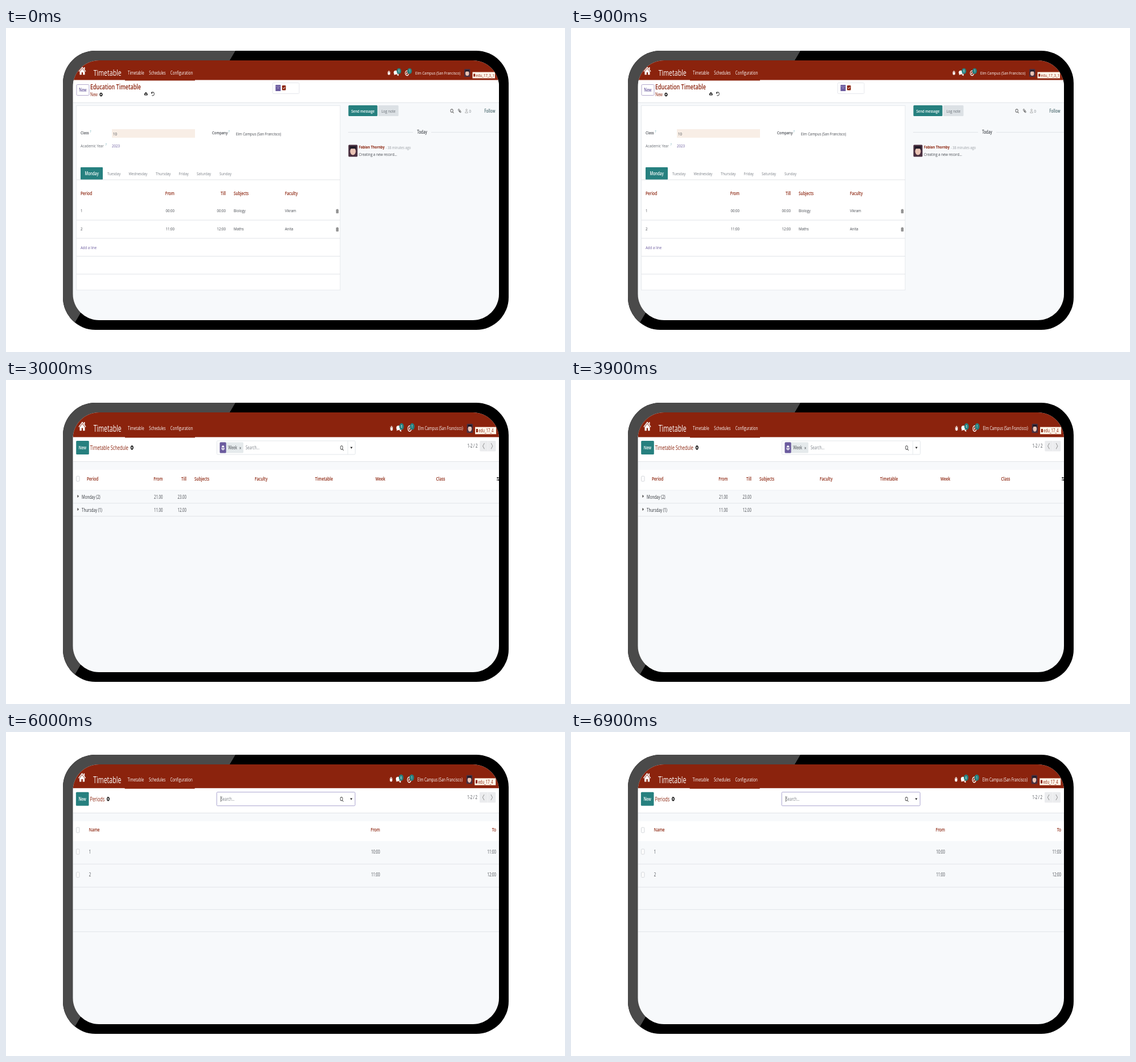
Write an HTML page that moves like this. It is 982 px wide and 570 px high and loops after 7.5 s.

```html
<!DOCTYPE html>
<html lang="en">
<head>
<meta charset="utf-8">
<title>Timetable screens</title>
<style>
html, body { margin: 0; width: 100%; height: 100%; overflow: hidden; background: #fff; }
svg { display: block; }
text { font-family: "Open Sans", "Noto Sans", sans-serif; white-space: pre; }
</style>
</head>
<body>
<svg id="stage" width="982" height="570" viewBox="0 0 982 570"></svg>
<script>
const RED = '#8b230d', TEAL = '#26807f', PURPLE = '#6b5b9e', INK = '#45494f',
  GREY = '#7c8188', LINE = '#e1e4e8', BG = '#f7f9fb';
const HOLD = 1500;
let out = '', k = 1; // k: vertical stretch of the current screen

const rect = (x, y, x2, y2, fill, r = 0, stroke = 'none') => {
  out += `<rect x="${x}" y="${y}" width="${x2 - x}" height="${y2 - y}" rx="${r}" fill="${fill}" stroke="${stroke}"/>`;
};
const hline = (y, x = 118, x2 = 866, color = LINE) => rect(x, y - .5, x2, y + .5, color);

// y is the middle of the capitals
const text = (x, y, s, fill = INK, size = 6.1, weight = 400, anchor = 'start') => {
  out += `<text transform="translate(${x} ${y + .36 * size * k}) scale(1 ${k})" font-size="${size}"
    font-weight="${weight}" fill="${fill}" text-anchor="${anchor}">${s}</text>`;
};
const right = (x, y, s, fill, size, weight) => text(x, y, s, fill, size, weight, 'end');
const mid = (x, y, s, fill, size, weight) => text(x, y, s, fill, size, weight, 'middle');
const head = (x, y, s, anchor) => text(x, y, s, RED, 6.5, 600, anchor);

const ICONS = {
  home: '<path d="M-6.5 .3L0-5.5 6.5 .3 5.7 1.2 0-3.8-5.7 1.2zM-4.5 1L0-3 4.5 1V5.2H1.2V2H-1.2V5.2H-4.5zM2.8-5H4.5V-1.8L2.8-3.2z"/>',
  bug: '<path d="M-1.3-1.6A1.3 1.3 0 0 1 1.3-1.6zM-1.8-1.2H1.8V1A1.8 1.8 0 0 1-1.8 1z"/><path d="M-2.8-1.6L2.8 2M2.8-1.6L-2.8 2M-2.8 .2H2.8" stroke="#fff" stroke-width=".5"/>',
  chat: '<ellipse cx="-.8" cy="-.5" rx="3.6" ry="2.7"/><path d="M-3.4 .8L-3.8 3-1 1.8zM1 2.4Q4 1.6 3.8-.6 5.4 1 4 2.6L4.4 4Q2 3.8 1 2.4"/>',
  clock: '<path d="M2-2.2A3.2 3.2 0 1 0 3.2 .6M0-1.4V.9H-1.6" fill="none" stroke="#fff" stroke-width="1.1"/>',
  gear: '<circle r="1.7" fill="none" stroke="#222" stroke-width="1.3"/><circle r="2.3" fill="none" stroke="#222" stroke-width="1" stroke-dasharray=".95 .86"/>',
  cloud: '<path d="M-2.2 2A1.6 1.6 0 0 1-2.2-.8 2.3 2.3 0 0 1 2.1-.8 1.5 1.5 0 0 1 2.2 2z" fill="#333"/><path d="M0-.8L1.2 .6H-1.2zM-.4 .3H.4V1.4H-.4z"/>',
  undo: '<path d="M-2.2-1.2A2.4 2.4 0 1 1-1.6 1.8M-2.5-2.6V-.8H-.7" fill="none" stroke="#333" stroke-width=".9"/>',
  lens: '<path d="M1.2 1.2L3 3M1.7-.4A2.1 2.1 0 1 1-2.5-.4 2.1 2.1 0 1 1 1.7-.4" fill="none" stroke="#555" stroke-width=".8"/>',
  clip: '<path d="M-1.6-.8L1.2 2.2Q2.6 2.2 2.2 .8L-1-2.6Q-2.8-3-2.6-1.2L.4 2M-.6-1L1 .8" fill="none" stroke="#555" stroke-width=".7"/>',
  user: '<path d="M-2.2 2.6V1.4Q0-.6 2.2 1.4V2.6zM1.2-1.4A1.2 1.2 0 1 1-1.2-1.4 1.2 1.2 0 1 1 1.2-1.4" fill="none" stroke="#999" stroke-width=".6"/>',
  trash: '<path d="M-2.3-1.8H2.3M-.8-2.5H.8M-1.7-1.2V2.4H1.7V-1.2zM-.6-.6V1.8M.6-.6V1.8" fill="none" stroke="#444" stroke-width=".6"/>',
  layers: '<path d="M0-2.6L2.8-1.3 0 0-2.8-1.3z"/><path d="M-2.8 .1L0 1.4 2.8 .1M-2.8 1.4L0 2.7 2.8 1.4" fill="none" stroke="#fff" stroke-width=".7"/>',
  down: '<path d="M-2-.9H2L0 1.3z" fill="#222"/>',
  next: '<path d="M-.9-1.8L1.2 0-.9 1.8z" fill="#222"/>',
  prevPage: '<path d="M1.4-3.4L-1.4 0 1.4 3.4" fill="none" stroke="#888" stroke-width=".7"/>',
  nextPage: '<path d="M-1.4-3.4L1.4 0-1.4 3.4" fill="none" stroke="#888" stroke-width=".7"/>',
  sliders: '<path d="M-2-1.3H3M-2 1.3H3" stroke="#222" stroke-width=".8"/><path d="M-1-2.2H.2V-.4H-1zM1 .4H2.2V2.2H1z" fill="#222"/>',
};
const icon = (name, x, y) => {
  out += `<g transform="translate(${x} ${y}) scale(1 ${k})" fill="#fff">${ICONS[name]}</g>`;
};

function avatar(x, y, x2, y2) {
  const cx = (x + x2) / 2, w = x2 - x, h = y2 - y;
  rect(x, y, x2, y2, '#4a3040', 1.5);
  out += `<ellipse cx="${cx}" cy="${y + h * .53}" rx="${w * .31}" ry="${h * .33}" fill="#e9c3b4"/>
    <path d="M${x + w * .15} ${y + h * .5}V${y + h * .12}H${x2 - w * .15}V${y + h * .5}L${x2 - w * .27} ${y + h * .32}H${x + w * .27}z" fill="#211b28"/>`;
}

function count(x, y, n) {
  out += `<ellipse cx="${x}" cy="${y}" rx="4" ry="${3.9 * k}" fill="${TEAL}"/>`;
  mid(x, y, n, '#fff', 4.8);
}

// y: middle of the menu text, dx / rx: shift of the left / right part
function header(bottom, y, dx, rx, db) {
  rect(118, 57, 866, bottom, RED);
  rect(209 + dx, bottom - 1, 332 + dx, bottom + 1, RED);
  icon('home', 134 + dx, y - 3.5);
  text(153.7 + dx, y + .5, 'Timetable', '#fff', 10.6);
  text(214 + dx, y, 'Timetable', '#fff', 6.2);
  text(251.3 + dx, y, 'Schedules', '#fff', 6.2);
  text(288.8 + dx, y, 'Configuration', '#fff', 6.2);
  icon('bug', 672.7 + rx, y);
  icon('chat', 685.5 + rx, y);
  icon('clock', 704.5 + rx, y);
  count(690.3 + rx, y - 3.2, 6);
  count(709 + rx, y - 3.2, 1);
  text(719 + rx, y, 'Elm Campus (San Francisco)', '#fff', 6.1);
  avatar(805 + rx, y - 5.4 * k, 815.5 + rx, y + 5.4 * k);
  const x2 = db.length > 8 ? 859 : 856.5 + rx;
  rect(819.5 + rx, y + 4 - 4.2 * k, x2, y + 4 + 4.2 * k, '#fff6ea');
  rect(821.3 + rx, y + 4 - 2 * k, 824.3 + rx, y + 4 + 2 * k, RED, .5);
  text(825.6 + rx, y + 4, db, RED, 6);
}

// Control panel of the list screens
function panel(top, bottom, y, dx, title, gearX, facet, facetEnd, pages) {
  rect(118, top, 866, bottom, '#fff');
  hline(bottom);
  rect(123.2 + dx, y - 12, 145.8 + dx, y + 12, TEAL, 1.5);
  mid(134.4 + dx, y, 'New', '#fff', 6.2, 600);
  text(147.8 + dx, y, title, RED, 7.35);
  icon('gear', gearX, y);
  rect(370.5 + dx, y - 12, 613.5 + dx, y + 12, '#fff', 1.5, facet ? '#e3e6ea' : '#a9a3cf');
  if (facet) {
    rect(375.5 + dx, y - 9.5, facetEnd, y + 9.5, '#e5eaec', 1.5);
    rect(375.5 + dx, y - 9.5, 386.7 + dx, y + 9.5, PURPLE, 1.5);
    icon('layers', 381.2 + dx, y);
    text(390.3 + dx, y, facet);
    mid(facetEnd - 5.5, y, '×', INK, 6.5);
    hline(y, 600.5 + dx, 601 + dx);
    rect(600 + dx, y - 12, 600.8 + dx, y + 12, '#e3e6ea');
  } else rect(377, y - 5, 377.7, y + 5, '#333');
  text(facet ? facetEnd + 4 : 377.5, y, 'Search...', GREY);
  icon('lens', 590 + dx, y + .5);
  icon('down', 606.8 + dx, y);
  const py = y - 2.8;
  right(828.4 + dx, py, pages);
  rect(832.3 + dx, py - 9.3, 860.5 + dx, py + 9.3, '#ebecee', 1.5);
  rect(846.2 + dx, py - 9.3, 846.8 + dx, py + 9.3, '#f7f7f8');
  icon('prevPage', 839 + dx, py);
  icon('nextPage', 853.5 + dx, py);
}

const check = (x, y) => rect(x - 2.7, y - 4.5, x + 2.7, y + 4.5, '#fff', 1.2, '#d3d6da');

// cols: left edges, with From and Till given by their right edges
function tableHead(top, bottom, y, cols) {
  rect(118, top, 866, bottom, '#fff');
  check(126.3, y + .7);
  ['Period', 'From', 'Till', 'Subjects', 'Faculty', 'Timetable', 'Week', 'Class'].forEach((s, i) =>
    head(cols[i], y, s, i == 1 || i == 2 ? 'end' : 'start'));
  icon('sliders', 864, y + 1);
}
function group(y, name, cols, from, till, open) {
  icon(open ? 'down' : 'next', open ? 127.8 : 126.5, y - 1);
  text(133, y, name, '#2f3338', 6.25, open ? 600 : 400);
  right(cols[1], y, from);
  right(cols[2], y, till);
}

function formScreen() {
  k = 1.3;
  rect(118, 91, 866, 131, '#fff');
  hline(131.3);
  header(91.5, 79, 0, 0, 'edu_17_3_1');
  rect(124, 99.5, 146, 118.5, '#fff', 1.5, '#b3a8cc');
  mid(135, 109, 'New', PURPLE, 6.2, 600);
  text(148, 104, 'Education Timetable', RED, 9, 600);
  text(148, 117, 'New', RED, 6.2);
  icon('gear', 167, 117);
  icon('cloud', 245.8, 116);
  icon('undo', 258, 116);
  rect(468.5, 96.5, 515, 115.5, '#fff', 1.5, '#e6e8ec');
  rect(473.5, 100, 482.5, 111, PURPLE, .5);
  rect(473.5, 102.5, 482.5, 103.1, '#b8b0d4');
  rect(476.5, 105, 479.5, 106, '#b8b0d4');
  rect(485, 101, 491.5, 109.5, RED, 1.2);
  out += '<path d="M486.7 105.2L488 107 490 103.5" fill="none" stroke="#fff" stroke-width=".9"/>';

  rect(123.5, 136.5, 587, 461, '#fff', 0, '#e6e9ed');
  text(131, 184, 'Class', INK, 6, 600);
  rect(186, 178, 332, 193, '#f8eee6');
  text(188, 186, '10');
  text(362, 184, 'Company', INK, 6, 600);
  text(404, 186, 'Elm Campus (San Francisco)');
  text(131, 207, 'Academic Year', '#666b72', 6);
  text(186, 207.5, '2023', PURPLE);
  [[147.5, 182], [390.8, 182], [174.8, 204.5]].forEach(([x, y]) => text(x, y, '?', '#3d8f9c', 4.6));

  rect(131, 245, 170, 267, TEAL, 1);
  mid(150.6, 256, 'Monday', '#fff', 6.2, 600);
  [[178, 'Tuesday'], [215.5, 'Wednesday'], [263, 'Thursday'], [303.5, 'Friday'], [335, 'Saturday'], [375, 'Sunday']]
    .forEach(([x, s]) => text(x, 256, s, GREY));
  hline(267, 124, 587);
  head(131, 291, 'Period');
  head(296, 291, 'From', 'end');
  head(386, 291, 'Till', 'end');
  head(400, 291, 'Subjects');
  head(490, 291, 'Faculty');
  [['00:00', '00:00', 'Biology', 'Vikram'], ['11:00', '12:00', 'Maths', 'Anita']].forEach((row, i) => {
    const y = 321.5 + i * 32;
    text(131, y, i + 1);
    right(296, y, row[0]);
    right(386, y, row[1]);
    text(400, y, row[2]);
    text(490, y, row[3]);
    icon('trash', 582, y + .8);
  });
  text(131, 386, 'Add a line', PURPLE);
  [338, 370, 401.5, 433].forEach(y => hline(y, 124, 587));

  rect(601.5, 136, 652.5, 155, TEAL, 1.5);
  mid(627, 146, 'Send message', '#fff', 6, 600);
  rect(654, 136, 689.5, 155, '#dce1e5', 1.5);
  mid(671.8, 146, 'Log note', '#666d74');
  icon('lens', 783.5, 146);
  icon('clip', 797, 146);
  icon('user', 809, 146);
  text(813.5, 146, '0', GREY);
  right(859.5, 146, 'Follow', '#4d6b70', 6.2, 600);
  hline(183.5, 601, 715);
  hline(183.5, 747, 866);
  mid(731, 183.5, 'Today', INK, 6.2, 600);
  avatar(601.5, 205.5, 617.5, 226.5);
  text(620, 209.5, 'Fabian Thornby', RED, 5.8, 700);
  text(667, 210, '- 38 minutes ago', '#9a9fa5', 5.7);
  text(620, 222, 'Creating a new record...');
}

function byClassScreen() {
  k = 1.45;
  const cols = [155, 286, 327, 341, 445, 549, 653, 757];
  panel(97, 141.5, 116.5, -.4, 'Timetable Schedule', 220.7, 'Class', 415, '1-1 / 1');
  header(97.5, 82, -.5, 3.6, 'edu_17_4');
  tableHead(155.5, 192, 171, cols);
  group(204.5, '10/10-A/2022 (3)', cols, '32.00', '35.00');
  hline(192.5, 118, 866, '#eef0f3');
  hline(215);
}

function byWeekScreen() {
  k = 1.5;
  const cols = [142, 275.5, 317, 331, 437, 543, 649, 755.5];
  panel(100, 143.5, 119, 0, 'Timetable Schedule', 221.3, 'Week', 417, '1-2 / 2');
  header(100.5, 85, 0, 4.6, 'edu_17_4');
  tableHead(158, 194, 173, cols);
  group(205.5, 'Monday (2)', cols, '21.00', '23.00');
  group(228.5, 'Thursday (1)', cols, '11.00', '12.00');
  hline(194, 118, 866, '#eef0f3');
  hline(216.8);
  hline(239.7);
}

function byFacultyScreen() {
  k = 1.6;
  const cols = [147, 306, 393.7, 408, 506, 596, 706, 785.5];
  panel(104, 152.8, 125.5, 1, 'Timetable Schedule', 222, 'Faculty', 421.5, '1-2 / 2');
  header(104.8, 88, .8, 5.2, 'edu_17_4');
  tableHead(169, 208, 185, cols);
  rect(118, 278, 866, 304, '#fff');
  hline(208, 118, 866, '#eef0f3');
  [233.3, 304, 348, 393].forEach(y => hline(y));
  hline(278, 227, 400);
  group(221.5, 'vikram (1)', cols, '10.00', '11.00', true);
  group(291.5, 'harish (2)', cols, '22.00', '24.00', true);
  [[254.5, 1, '10.00', '11.00', 'maths', 'vikram', 'Monday'],
   [324.5, 2, '11.00', '12.00', 'english', 'harish', 'Monday'],
   [369, 2, '11.00', '12.00', 'maths', 'harish', 'Thursday']].forEach(([y, n, from, till, subject, who, day]) => {
    check(126.8, y);
    right(cols[1], y, from, INK, 5.8);
    right(cols[2], y, till, INK, 5.8);
    [[0, n], [3, subject], [4, who], [5, '10/10-A/2022'], [6, day], [7, '10-A']]
      .forEach(([c, s]) => text(cols[c], y, s, INK, 5.8));
  });
}

function periodsScreen() {
  k = 1.45;
  panel(98, 142.5, 117.8, -.3, 'Periods', 179.5, '', 0, '1-2 / 2');
  header(98.8, 83.5, -.4, 3.8, 'edu_17_4');
  rect(118, 157, 866, 192, '#fff');
  check(126.2, 172.5);
  head(145.8, 172, 'Name');
  head(657, 172, 'From', 'end');
  head(861, 172, 'To', 'end');
  [['10:00', '11:00'], ['11:00', '12:00']].forEach(([from, to], i) => {
    const y = 210.5 + i * 40.7;
    check(126.2, y);
    text(145.8, y, i + 1);
    right(657, y, from);
    right(861, y, to);
  });
  [232.3, 273, 312.3, 351.3].forEach(y => hline(y));
}

const screens = [formScreen, byClassScreen, byWeekScreen, byFacultyScreen, periodsScreen];
out = `<clipPath id="body"><rect x="100" y="40" width="783" height="491" rx="57"/></clipPath>
  <clipPath id="screen"><rect x="117.5" y="57" width="748.5" height="457" rx="46"/></clipPath>
  <g clip-path="url(#body)"><path d="M100 40H883V531H100z"/>
  <path d="M100 40H403L113.5 531H100z" fill="#4a4a4a"/></g>
  <g clip-path="url(#screen)"><path d="M117 57H866V514H117z" fill="${BG}"/>`;
for (const draw of screens) {
  out += '<g class="view" display="none">';
  draw();
  out += '</g>';
}
document.getElementById('stage').innerHTML = out + '</g>';

const views = document.querySelectorAll('.view');
function tick() {
  const now = Math.floor(performance.now() / HOLD) % views.length;
  views.forEach((v, i) => v.setAttribute('display', i == now ? 'inline' : 'none'));
  requestAnimationFrame(tick);
}
tick();
</script>
</body>
</html>
```
